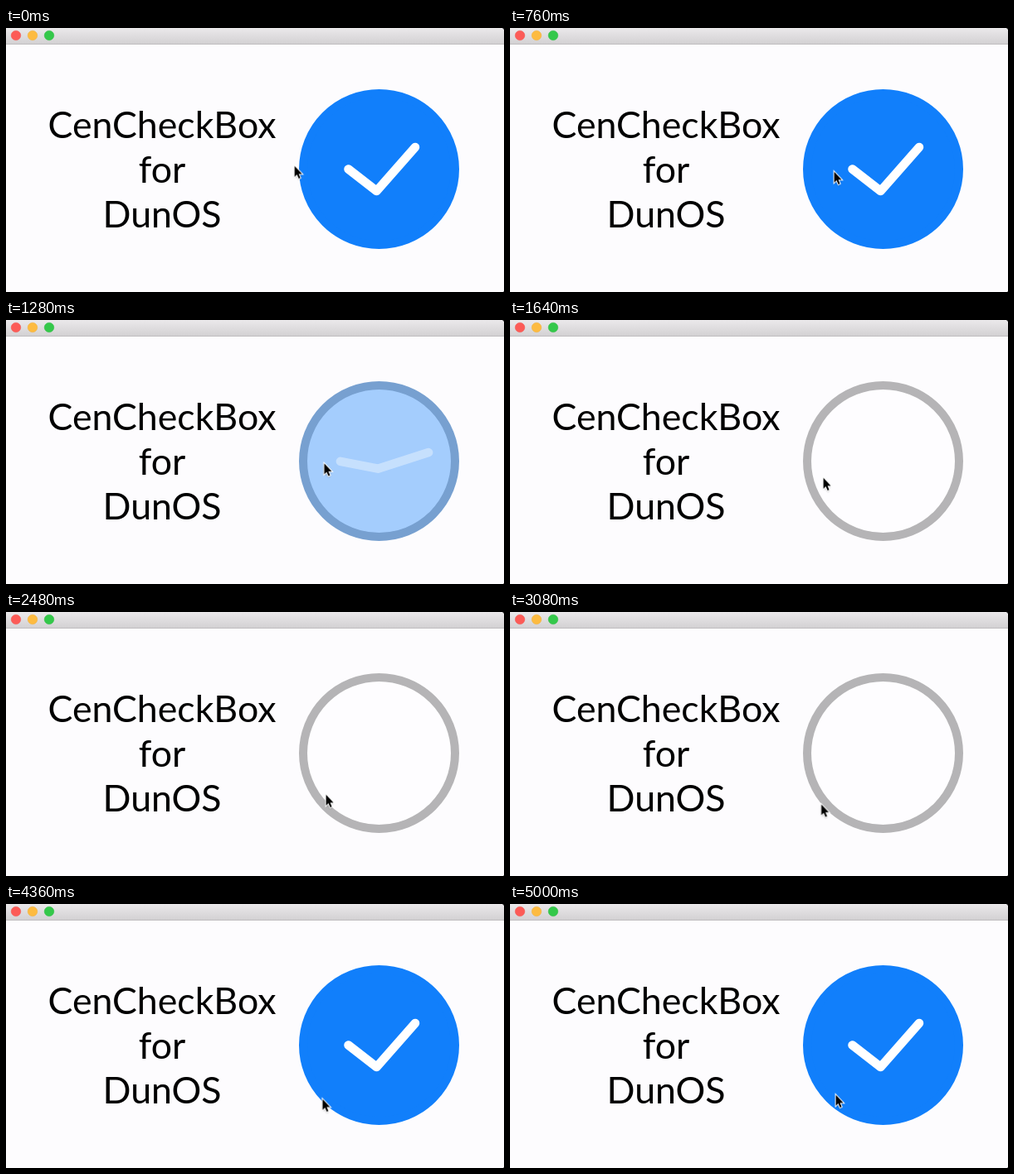
An HTML page for the animation above (5.04 s loop, 600 px wide and 319 px high).

```html
<!DOCTYPE html>
<html lang="en">
<head>
<meta charset="utf-8">
<title>Check box demo</title>
<style>
  html, body { margin: 0; width: 100%; height: 100%; overflow: hidden; background: #fdfcfe; }
  svg { display: block; width: 600px; height: 319px; }
  text { font: 44.7px Lato, "Open Sans", sans-serif; text-anchor: middle; }

  .disc, .tick, .pointer { animation: 5040ms linear infinite; }
  .disc { stroke-width: 10; animation-name: disc; }
  .tick {
    fill: none; stroke: #fff; stroke-width: 10.5;
    stroke-linecap: round; stroke-linejoin: round;
    animation-name: tick;
  }
  .pointer { animation-name: move; }

  /* off: 1120-1380 ms, on: 4060-4320 ms */
  @keyframes disc {
    0%, 22.222%, 85.714%, 100% { fill: #117ffb; stroke: #117ffb; }
    27.381%, 80.556% { fill: #fefdff; stroke: #b5b4b6; }
  }
  @keyframes tick {
    0%, 22.222%, 85.714%, 100% { d: path("M412.5 170.5L446.5 197L493 144"); opacity: 1; }
    27.381%, 80.556% { d: path("M397 171L449 169L519 170"); opacity: 0; }
  }
  @keyframes move {
    0% { transform: translate(348px, 167.5px); }
    5% { transform: translate(366px, 171px); }
    10% { transform: translate(383px, 174px); }
    15.079% { transform: translate(391px, 174.5px); }
    19.8% { transform: translate(386px, 172px); }
    23.81% { transform: translate(385px, 171.5px); }
    27.8% { transform: translate(382px, 178px); }
    32.54% { transform: translate(378px, 191.5px); }
    38.5% { transform: translate(376px, 206px); }
    44.444% { transform: translate(378px, 217px); }
    49.206% { transform: translate(386px, 221.5px); }
    55% { transform: translate(376px, 229px); }
    66.667% { transform: translate(375px, 237px); }
    74.603% { transform: translate(380px, 238.5px); }
    85.714% { transform: translate(381px, 237px); }
    93% { transform: translate(388px, 233px); }
    99.206%, 99.99% { transform: translate(393px, 231.5px); }
    100% { transform: translate(348px, 167.5px); }
  }
</style>
</head>
<body>
<svg viewBox="0 0 600 319">
  <defs>
    <linearGradient id="bar" x2="0" y2="1">
      <stop stop-color="#ebe9eb"/>
      <stop offset="1" stop-color="#d3d1d3"/>
    </linearGradient>
    <filter id="soft" x="-50%" y="-50%" width="200%" height="200%">
      <feGaussianBlur stdDeviation="1"/>
    </filter>
    <path id="arrow" d="M0 0V13L2.9 10.3L5.1 15.2L7 14.3L4.9 9.5H9Z"/>
  </defs>

  <rect width="600" height="319" fill="#fdfcfe"/>
  <rect width="600" height="19" fill="url(#bar)"/>
  <rect y="19" width="600" height="1" fill="#bfbdbf"/>
  <path d="M598 0H600V2ZM600 318V319H599Z" fill="#222"/>
  <g stroke-width=".5">
    <circle cx="12" cy="9" r="5.8" fill="#fc5b57" stroke="#f0544f"/>
    <circle cx="32" cy="9" r="5.8" fill="#fdbb40" stroke="#efae39"/>
    <circle cx="52" cy="9" r="5.8" fill="#34c84a" stroke="#2dba40"/>
  </g>

  <text x="188" y="133">CenCheckBox</text>
  <text x="188" y="187">for</text>
  <text x="188" y="241">DunOS</text>

  <circle class="disc" cx="449.5" cy="170.5" r="91.5"/>
  <path class="tick" d="M412.5 170.5L446.5 197L493 144"/>

  <g class="pointer">
    <g transform="translate(-.4 -.7)">
      <use href="#arrow" y="1.5" opacity=".35" filter="url(#soft)"/>
      <use href="#arrow" fill="#fff" stroke="#fff" stroke-width="2"/>
      <use href="#arrow"/>
    </g>
  </g>
</svg>
</body>
</html>
```
